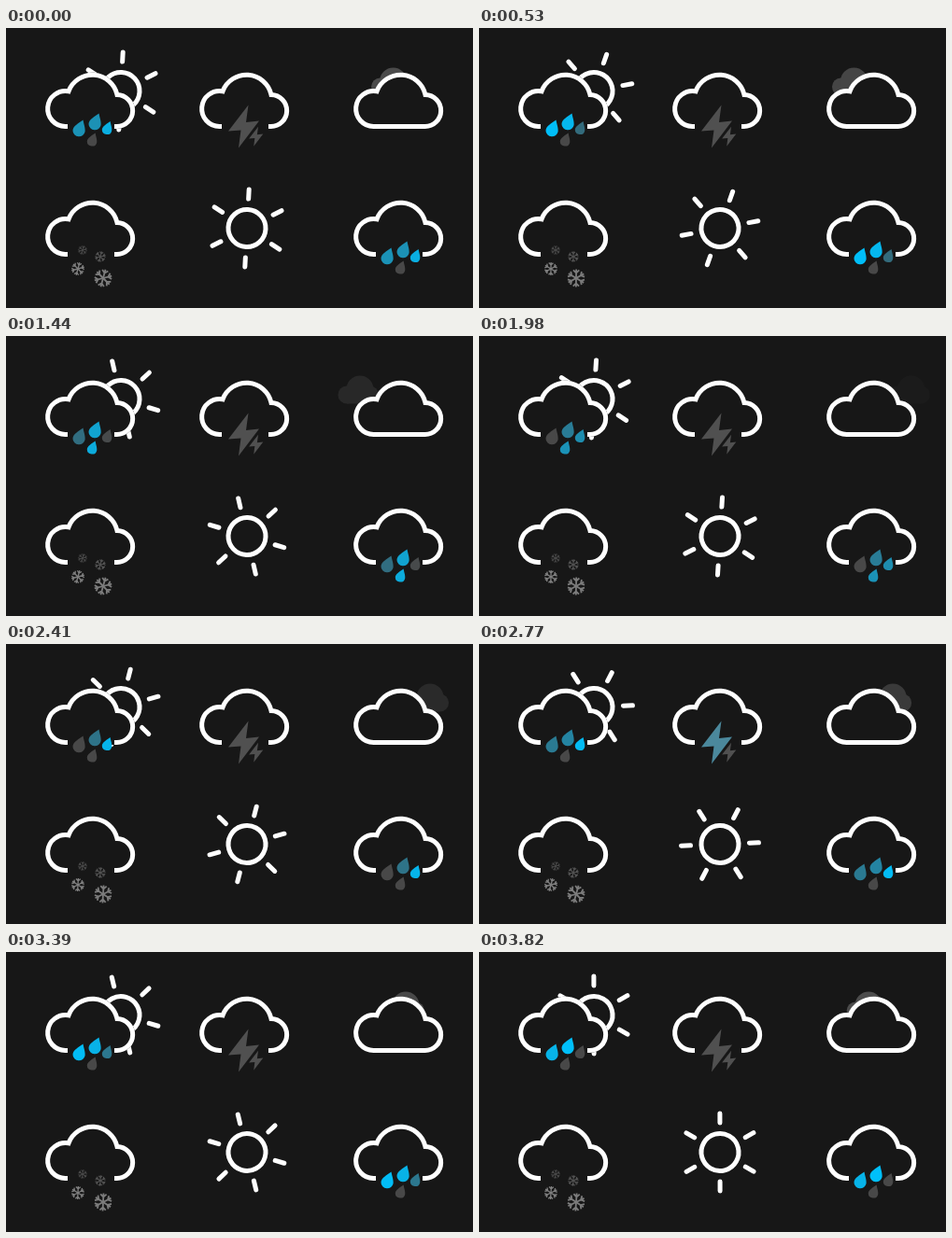
Animation of 500 by 300 pixels, one loop 3840 ms. Source, as an HTML page:

```html
<!DOCTYPE html>
<html lang="en">
<head>
<meta charset="utf-8">
<title>Weather icons</title>
<style>
  html, body { margin: 0; width: 100%; height: 100%; overflow: hidden; background: #171717; }
  svg { display: block; width: 100vw; height: 100vh; }
  .line { fill: none; stroke: #fff; stroke-width: 5; }
  .mask { fill: #171717; stroke: #171717; stroke-width: 5; }
  .ray { stroke-linecap: round; }
  .flake { fill: none; stroke-width: 1.8; }
</style>
</head>
<body>
<svg viewBox="0 0 500 300">
  <defs>
    <path id="cloud" d="M66 105.5H63.5A19 19 0 1 1 67 67.8A27.2 27.2 0 0 1 119 71.5A17 17 0 0 1 118.3 105.5H116"/>
    <g id="closed"><use href="#cloud"/><path d="M65 105.5H117"/></g>
    <path id="drop" d="M4.5-9.5C5.5-4 7-1 6.6 3A6.6 6.3 0 0 1-6.5 2C-6.5-3 0-6 4.5-9.5Z"/>
    <path id="bolt" d="M5.5-23.5L-16 4.5L-2.5 3.5L-5 22.5L17-6.5L3-5Z"/>
    <path id="arm" d="M0 0V-9.5M-3.2-8.6L0-5.6L3.2-8.6"/>
    <g id="sun" class="line"><circle r="20"/></g>
    <g id="flake" class="flake"></g>
  </defs>

  <g transform="translate(123 67.5)"><use href="#sun" class="spin"/></g>
  <use href="#closed" class="mask"/>
  <use href="#cloud" class="line"/>
  <g class="rain"></g>

  <use href="#cloud" class="line" x="165"/>
  <use href="#bolt" id="flash" transform="translate(254 106)"/>
  <use href="#bolt" fill="#505050" transform="translate(267.5 116.5) scale(.46)"/>

  <g id="drift" fill="#4c4c4c">
    <circle cx="9.5" cy="63" r="9.5"/>
    <circle cx="23.5" cy="57" r="14.5"/>
    <circle cx="34" cy="63" r="9.5"/>
    <path d="M9.5 60H34V72.5H9.5Z"/>
  </g>
  <use href="#closed" class="mask" x="330"/>
  <use href="#closed" class="line" x="330"/>

  <use href="#cloud" class="line" y="137"/>
  <g id="snow">
    <g stroke="#4c4c4c" transform="translate(82 238) scale(.5)"><use href="#flake" class="sway"/></g>
    <g stroke="#545454" transform="translate(101 245) scale(.6)"><use href="#flake" class="sway"/></g>
    <g stroke="#808080" transform="translate(77 258) scale(.74)"><use href="#flake" class="sway"/></g>
    <g stroke="#7c7c7c" transform="translate(104 268)"><use href="#flake" class="sway"/></g>
  </g>

  <g transform="translate(258 214.5)"><use href="#sun" class="spin"/></g>

  <use href="#cloud" class="line" x="330" y="137"/>
  <g class="rain" transform="translate(330 137)"></g>
</svg>
<script>
const $ = s => document.querySelector(s);
const $$ = s => [...document.querySelectorAll(s)];

function add(parent, tag, attrs) {
  const el = document.createElementNS('http://www.w3.org/2000/svg', tag);
  for (const k in attrs) el.setAttribute(k, attrs[k]);
  return parent.appendChild(el);
}

for (let a = 0; a < 360; a += 60) {
  add($('#sun'), 'path', { class: 'ray', d: 'M0-31.5V-41.5', transform: `rotate(${a})` });
  add($('#flake'), 'use', { href: '#arm', transform: `rotate(${a})` });
}

// Each drop glows as a clipped cosine: peak time, mean and swing.
const DROPS = [
  { x: 78, y: 108, size: 1, peak: .7, mean: .45, swing: .55 },
  { x: 95, y: 101, size: 1, peak: .95, mean: .68, swing: .32 },
  { x: 108, y: 107.5, size: .8, peak: 2.75, mean: .45, swing: .55 },
  { x: 92, y: 120, size: .8, peak: 1.75, mean: -.1, swing: 1 }
];
const drops = $$('.rain').flatMap(g => DROPS.map(d => ({
  ...d,
  el: add(g, 'use', { href: '#drop', transform: `translate(${d.x} ${d.y}) scale(${d.size})` })
})));

const GRAY = [72, 72, 72], BLUE = [0, 191, 250], STEEL = [80, 80, 80], FLASH = [75, 138, 158];
const clamp = v => Math.min(1, Math.max(0, v));
const mix = (a, b, p) => `rgb(${a.map((v, i) => Math.round(v + (b[i] - v) * p))})`;
const wave = (t, period) => Math.cos(2 * Math.PI * t / period);

// Motion advances in small steps, with a pause in the middle.
function tick(ms) {
  if (ms < 1440) return Math.min(Math.floor(ms / 88.2), 13) * 88.2;
  return ms < 1800 ? 1440 : 1800 + Math.floor((ms - 1800) / 87.8) * 87.8;
}

function draw(ms) {
  const t = .1 + 1.02 * tick(ms % 3840) / 1000;
  const pass = (t + 2) % 4 / 4;

  for (const el of $$('.spin')) el.setAttribute('transform', `rotate(${30 * t})`);
  for (const el of $$('.sway')) el.setAttribute('transform', `rotate(${8 + 8 * wave(t, 1.5)})`);
  for (const d of drops)
    d.el.setAttribute('fill', mix(GRAY, BLUE, clamp(d.mean + d.swing * wave(t - d.peak, 3))));

  $('#flash').setAttribute('fill', mix(STEEL, FLASH, clamp(1 - Math.abs(t - 2.93) / .3)));
  $('#drift').setAttribute('transform', `translate(${442 - 97 * pass} 0)`);
  $('#drift').setAttribute('opacity', Math.sin(Math.PI * pass));
}

const start = performance.now();
function loop() {
  draw(performance.now() - start);
  requestAnimationFrame(loop);
}
loop();
</script>
</body>
</html>
```
